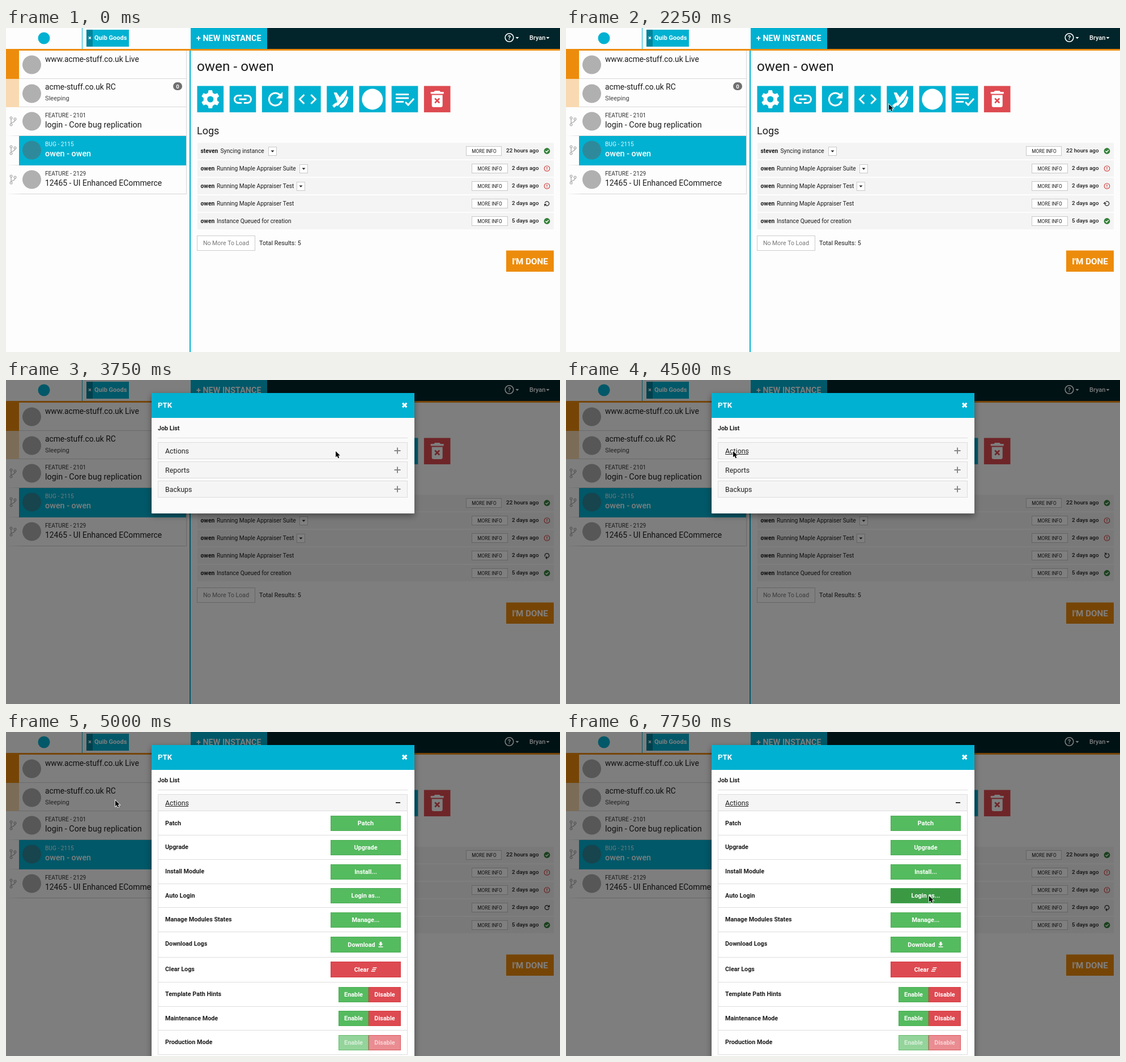
These frames come from a looping animation (978 px wide and 573 px high, 8000 ms). An HTML page with a canvas:

```html
<!DOCTYPE html>
<html lang="en">
<head>
<meta charset="utf-8">
<title>Instance dashboard</title>
<style>
html, body { margin: 0; width: 100%; height: 100%; overflow: hidden; background: #fdfdfd; }
canvas { display: block; }
</style>
</head>
<body>
<canvas id="stage" width="978" height="573"></canvas>
<script>
const ctx = document.getElementById('stage').getContext('2d');
const LOOP = 8000, STEP = 250;
const CYAN = '#00b1d1', ORANGE = '#ed8c0c', RED = '#de4a51', GREEN = '#55bb5f', INK = '#1c1c1c';

// Cursor path: time, x, y
const PATH = [
  [250, 172, 364], [1250, 350, 66], [2250, 570, 135], [3500, 582, 126], [3750, 582, 126],
  [4500, 295, 126], [4750, 295, 126], [5000, 193, 121], [6250, 294, 433], [7500, 641, 290]
];

function rect(x, y, w, h, fill, stroke) {
  if (fill) { ctx.fillStyle = fill; ctx.fillRect(x, y, w, h); }
  if (stroke) {
    ctx.strokeStyle = stroke; ctx.lineWidth = 1;
    ctx.strokeRect(x + 0.5, y + 0.5, w - 1, h - 1);
  }
}

function text(str, x, y, size, color = INK, weight = 400, align = 'left') {
  ctx.font = `${weight} ${size}px Roboto, "Open Sans", sans-serif`;
  ctx.fillStyle = color;
  ctx.textAlign = align;
  ctx.fillText(str, x, y);
}

function disc(x, y, r, fill) {
  ctx.fillStyle = fill;
  ctx.beginPath(); ctx.arc(x, y, r, 0, 7); ctx.fill();
}

function line(d, color, width) {
  ctx.strokeStyle = color; ctx.lineWidth = width;
  ctx.stroke(new Path2D(d));
}

function shape(d, color) {
  ctx.fillStyle = color;
  ctx.fill(new Path2D(d));
}

function at(x, y, draw, angle = 0) {
  ctx.save(); ctx.translate(x, y); ctx.rotate(angle); draw(); ctx.restore();
}

const inside = (p, x, y, w, h) => p.x > x && p.x < x + w && p.y > y && p.y < y + h;

const caret = (x, y, color) => shape(`M${x - 3} ${y - 1.5}h6l-3 3.2z`, color);

function cross(x, y, r, color, width) {
  line(`M${x - r} ${y - r}l${2 * r} ${2 * r}M${x + r} ${y - r}l${-2 * r} ${2 * r}`, color, width);
}

const icons = [
  function gear() {
    for (let i = 0; i < 6; i++) {
      at(0, 0, () => shape('M-4.6 -9L-3.2 -16H3.2L4.6 -9z', '#fff'), i * Math.PI / 3);
    }
    disc(0, 0, 12, '#fff');
    disc(0, 0, 5.6, CYAN);
  },
  function link() {
    line('M-2 -6.5H-8a6.5 6.5 0 0 0 0 13H-2M2 -6.5H8a6.5 6.5 0 0 1 0 13H2M-6.5 0H6.5', '#fff', 3);
  },
  function reload() {
    line('M8.2 -7.6A11 11 0 1 0 10.8 3.2', '#fff', 3.2);
    shape('M13 -13V-1.5H1.5z', '#fff');
  },
  function code() {
    line('M-6 -8L-14 0L-6 8M6 -8L14 0L6 8', '#fff', 3);
  },
  function tools() {
    shape('M12 -17Q14 -10 7 0L-4 12L-8 9L2 -7z', '#fff');
    shape('M-11 -12L-6 -12L0 -3L-5 4z', '#fff');
    shape('M12 -6L15 -3L12 7Q7 16 1 15L-1 12L6 5z', '#fff');
    line('M-6 8L-12 13', '#fff', 5);
  },
  function disk() { disc(0, 0, 18.5, '#fff'); },
  function checklist() {
    line('M-16 -8.5H7M-16 -2H7M-16 4.5H-2M1 5L6 10L16 -1', '#fff', 3);
  },
  function trash() {
    shape('M-11.5 -13H-6L-4 -15H4L6 -13H11.5V-9.5H-11.5zM-9.5 -7.5H9.5V11Q9.5 14 6.5 14H-6.5Q-9.5 14 -9.5 11z', '#fff');
    cross(0, 2.5, 4, RED, 2.6);
  }
];

function header() {
  rect(326, 0, 652, 37, '#02252b');
  rect(326, 0, 135, 37, CYAN);
  rect(0, 37, 978, 3, ORANGE);
  rect(134, 0, 1, 37, CYAN);
  disc(67, 18, 10.5, CYAN);
  rect(142, 3, 75, 30, CYAN);
  rect(142, 3, 11, 30, '#00849b');
  cross(148, 17.5, 2, '#fff', 1.5);
  text('Quib Goods', 156, 21, 11, '#fff', 700);
  text('+ NEW INSTANCE', 336, 23, 14.4, '#fff', 700);
  ctx.strokeStyle = '#fff'; ctx.lineWidth = 1.6;
  ctx.beginPath(); ctx.arc(888.5, 17, 7.3, 0, 7); ctx.stroke();
  text('?', 888.5, 21, 11, '#fff', 700, 'center');
  caret(902.5, 17.5, '#fff');
  text('Bryan', 924, 21, 11, '#fff', 500);
  caret(956.5, 17.5, '#fff');
}

function branch(y) {
  ctx.strokeStyle = '#aaa'; ctx.lineWidth = 1.2;
  for (const [dx, dy] of [[9, -6], [9, 6], [16, -4]]) {
    ctx.beginPath(); ctx.arc(dx, y + dy, 1.9, 0, 7); ctx.stroke();
  }
  line(`M9 ${y - 4}V${y + 4}M16 ${y - 2}Q16 ${y + 1} 9 ${y + 3}`, '#aaa', 1.3);
}

function sidebar() {
  rect(0, 40, 23, 50, ORANGE);
  rect(0, 90, 23, 50, '#f8d9b1');
  rect(318, 40, 1, 254, '#d8d8d8');
  rect(324, 40, 2, 533, CYAN);
  const fade = ctx.createLinearGradient(0, 0, 30, 0);
  fade.addColorStop(0, '#fdfdfd');
  fade.addColorStop(1, '#d4d4d4');
  rect(23, 89, 295, 1, '#d8d8d8');
  rect(23, 139, 295, 1, '#d8d8d8');
  for (const y of [190, 242, 293]) rect(0, y, 318, 1, fade);
  rect(23, 191, 295, 52, CYAN);
  [65, 116, 165, 216, 268].forEach((y, i) => disc(45.5, y, 16.5, i === 3 ? '#2e8a9b' : '#b0b0b0'));
  [165, 216, 268].forEach(branch);

  text('www.acme-stuff.co.uk Live', 69, 60, 13.8);
  text('acme-stuff.co.uk RC', 69, 109, 13.8);
  text('Sleeping', 69, 128, 11.2, '#444');
  ctx.fillStyle = '#707070';
  ctx.beginPath(); ctx.roundRect(295, 96, 16, 14, 7); ctx.fill();
  text('0', 303, 107, 9.5, '#fff', 700, 'center');
  text('FEATURE - 2101', 69, 158, 10.1, '#333');
  text('login - Core bug replication', 69, 176, 14.4);
  text('BUG - 2115', 69, 209, 10.2, '#e6f8fb');
  text('owen - owen', 69, 227, 14.4, '#fff', 500);
  text('FEATURE - 2129', 69, 261, 10.1, '#333');
  text('12465 - UI Enhanced ECommerce', 69, 279, 13.9);
}

function spinner(y, step) {
  at(955, y, () => {
    line('M2.6 -2.8A3.8 3.8 0 1 0 3.7 1', '#333', 1.3);
    shape('M4.8 -5V-0.6H0.4z', '#333');
  }, (step + 4) * Math.PI / 4);
}

function status(kind, y, step) {
  if (kind === 'ok') {
    disc(955, y, 5.4, '#34803a');
    line(`M952.4 ${y}l2 2l3.4 -3.8`, '#fff', 1.4);
  } else if (kind === 'bad') {
    ctx.strokeStyle = '#cf3b3b'; ctx.lineWidth = 1.1;
    ctx.beginPath(); ctx.arc(955, y, 4.8, 0, 7); ctx.stroke();
    line(`M955 ${y - 2.8}v3.4M955 ${y + 1.4}v1.4`, '#cf3b3b', 1.3);
  } else spinner(y, step);
}

const logs = [
  ['steven', 'Syncing instance', 378.5, '22 hours ago', 'ok', 463],
  ['owen', 'Running Maple Appraiser Suite', 372, '2 days ago', 'bad', 518],
  ['owen', 'Running Maple Appraiser Test', 372, '2 days ago', 'bad', 513],
  ['owen', 'Running Maple Appraiser Test', 372, '2 days ago', 'busy'],
  ['owen', 'Instance Queued for creation', 372, '5 days ago', 'ok']
];

function main(step, pressed) {
  text('owen - owen', 337, 76, 24.3);
  icons.forEach((draw, i) => {
    const x = 337.5 + i * 57.2, down = pressed && i === 4;
    rect(x, 102.5, 46.6, 46.6, i === 7 ? RED : down ? '#10a0ba' : CYAN);
    if (down) {
      ctx.strokeStyle = '#7f969b'; ctx.lineWidth = 2;
      ctx.strokeRect(x, 102.5, 46.6, 46.6);
    }
    at(x + 23.3, 126, draw);
  });
  text('Logs', 337, 188, 18);
  logs.forEach(([who, what, x, when, kind, drop], i) => {
    const y = 203 + i * 31;
    rect(338, y, 629, 29, '#f4f4f4');
    text(who, 343.5, y + 17.5, 10.3, INK, 700);
    text(what, x, y + 17.5, 10.25);
    if (drop) {
      rect(drop, y + 7, 15, 16, '#fff', '#c8c8c8');
      caret(drop + 7.5, y + 15, '#222');
    }
    const bx = i ? 822 : 812;
    rect(bx, y + 6, i ? 64 : 63, 17, '#fff', '#c8c8c8');
    text('MORE INFO', bx + 32, y + 17.7, 8.3, INK, 400, 'center');
    text(when, 940.5, y + 17, 9.8, INK, 500, 'right');
    status(kind, y + 14.5, step);
  });
  rect(337, 367, 103, 27, '#fff', '#ccc');
  text('No More To Load', 388.5, 384, 10.6, '#777', 400, 'center');
  text('Total Results: 5', 447, 384, 10.8);
  rect(883, 393.5, 84, 37.5, ORANGE);
  text("I'M DONE", 925, 418, 15.2, '#fff', 700, 'center');
}

// Label, separator below, button text
const jobs = [
  ['Patch', 182, 'Patch'], ['Upgrade', 225, 'Upgrade'], ['Install Module', 268, 'Install...'],
  ['Auto Login', 310, 'Login as...'], ['Manage Modules States', 353, 'Manage...'],
  ['Download Logs', 398, 'Download'], ['Clear Logs', 442, 'Clear'],
  ['Template Path Hints', 485], ['Maintenance Mode', 527], ['Production Mode', 570]
];

function button(label, x, y, w, h, red, cursor, shift = 0) {
  const over = inside(cursor, x, y, w, h);
  const fill = red ? (over ? '#c2353c' : RED) : (over ? '#3b9944' : GREEN);
  rect(x, y, w, h, fill, red ? '#d63c43' : '#49ac53');
  text(label, x + w / 2 + shift, y + h / 2 + 3.7, 10.9, '#fff', 700, 'center');
}

function jobList(cursor) {
  rect(268, 140, 441, 433, '#fff');
  rect(268, 140, 1, 431, '#ddd');
  rect(708, 140, 1, 431, '#ddd');
  let top = 140;
  for (const [label, bottom, action] of jobs) {
    const withIcon = label.endsWith('Logs');
    const h = withIcon ? 28 : 27, y = bottom - h - (withIcon ? 8 : 7);
    rect(268, bottom, 441, 1, '#ddd');
    text(label, 281, top + 25, 10.8, INK, 700);
    if (action) button(action, 573, y, 124, h, action === 'Clear', cursor, withIcon ? -7.5 : 0);
    else {
      ctx.globalAlpha = label === 'Production Mode' ? 0.63 : 1;
      button('Enable', 587, y, 53, h, false, cursor);
      button('Disable', 640, y, 57, h, true, cursor);
      ctx.globalAlpha = 1;
    }
    top = bottom;
  }
  shape('M659.8 371h3.4v3.5h2.3l-4 4l-4 -4h2.3zM657.5 379.3h8v1.5h-8z', '#fff');
  line('M647.5 417h7M646 420h7M644.5 423h7', '#fff', 1.3);
}

function section(label, y, open, underline) {
  rect(268, y, 441, 30, '#f5f5f5', '#ddd');
  text(label, 281, y + 19.5, 12.4, '#222');
  if (underline) rect(281, y + 21, 41, 1, '#222');
  if (open) rect(688, y + 14, 8, 2, '#333');
  else line(`M685.5 ${y + 15}h11M691 ${y + 9.5}v11`, '#888', 2);
}

function modal(open, cursor) {
  rect(0, 0, 978, 573, 'rgba(0,0,0,0.5)');
  ctx.save();
  ctx.shadowColor = 'rgba(0,0,0,0.4)'; ctx.shadowBlur = 11; ctx.shadowOffsetY = 4;
  rect(257, 23, 464, open ? 560 : 213, open ? '#fefefe' : '#fafafa');
  ctx.restore();
  rect(257, 23, 464, 44, CYAN);
  text('PTK', 268, 49, 13.2, '#fff', 700);
  cross(703.7, 44.5, 3.6, '#fff', 3.2);
  text('Job List', 268, 89, 10.7, INK, 700);
  rect(268, 102, 441, 1, '#ddd');
  section('Actions', 110, open, open || inside(cursor, 281, 110, 41, 30));
  if (open) jobList(cursor);
  else {
    section('Reports', 144);
    section('Backups', 178);
  }
}

function cursorAt(t) {
  const i = PATH.findIndex(p => p[0] > t);
  if (i < 0) { const [, x, y] = PATH[PATH.length - 1]; return { x, y }; }
  if (i === 0) return { x: -50, y: -50 };
  const [t0, x0, y0] = PATH[i - 1], [t1, x1, y1] = PATH[i];
  const u = (t - t0) / (t1 - t0), k = u * u * (3 - 2 * u);
  return { x: x0 + (x1 - x0) * k, y: y0 + (y1 - y0) * k };
}

function pointer({ x, y }) {
  at(x, y, () => {
    const d = 'M0 0V10.5L2.5 8.3L4.3 12.2L6.2 11.4L4.5 7.6H7.8z';
    line(d, '#fff', 1.6);
    shape(d, '#000');
  });
}

function frame(now) {
  const step = Math.floor((now % LOOP) / STEP), t = step * STEP;
  const cursor = cursorAt(t);
  rect(0, 0, 978, 573, '#fdfdfd');
  header();
  sidebar();
  main(step, t >= 3500);
  if (t >= 3750) modal(t >= 4750, cursor);
  pointer(cursor);
  requestAnimationFrame(frame);
}
requestAnimationFrame(frame);
</script>
</body>
</html>
```
